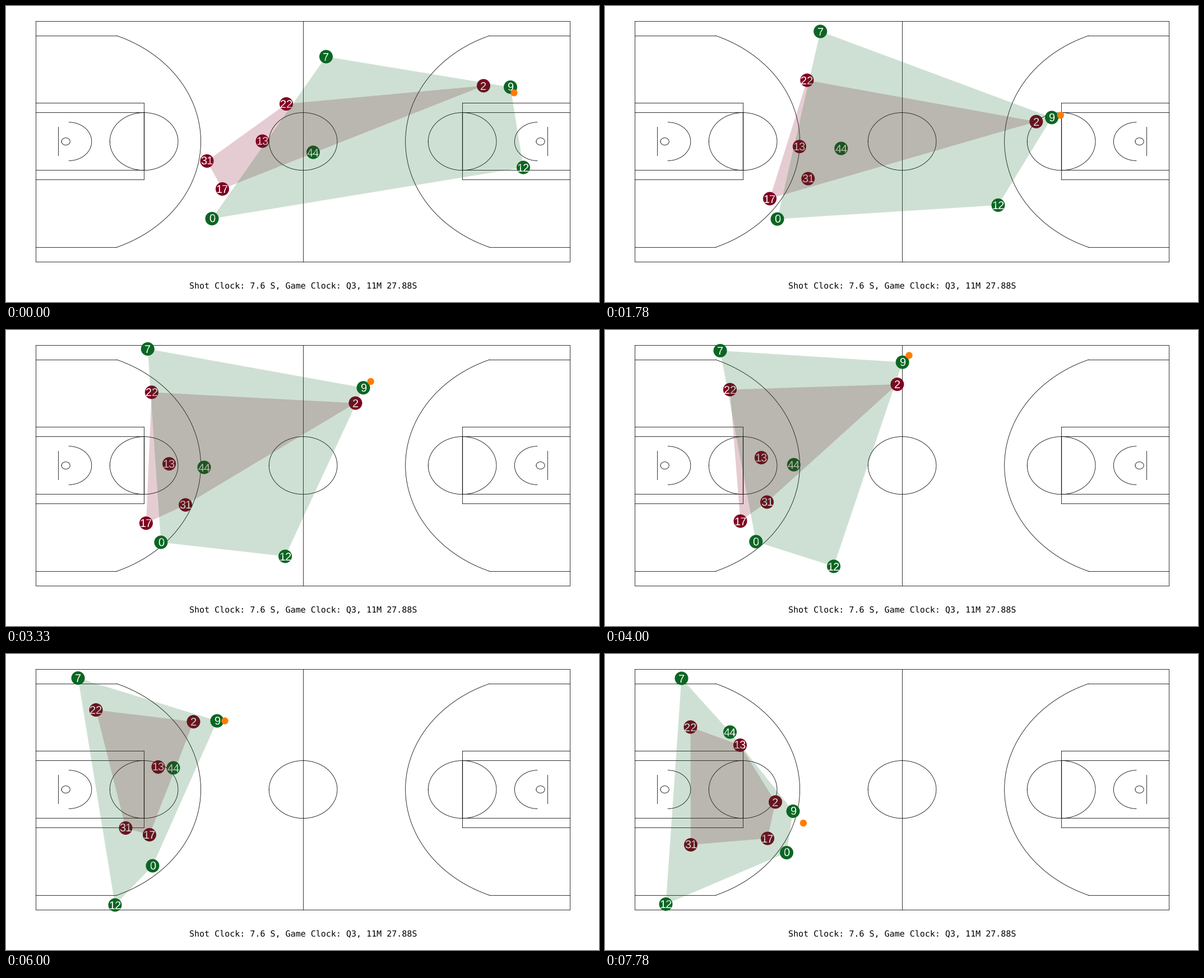
Recreate the animation shown at these times as a matplotlib script. Size 1058 by 529 pixels, loop 8 s.

```python
import math

import matplotlib.pyplot as plt
import numpy as np
from matplotlib.animation import FuncAnimation
from matplotlib.patches import Circle, Polygon

W, H, DPI = 1058, 529, 64
PX = 72 / DPI  # points per pixel
LOOP_MS, TICK_MS = 8000, 40
STEPS = 36  # positions per loop, each held for several ticks
GREEN, CRIMSON, ORANGE = "#0b6623", "#800020", "#ff7d05"
BEATS = np.array([0, 11, 22, 27, 35])  # steps at which the key points lie

# Court in feet, mapped onto the stage
LEFT, RIGHT, TOP, BOTTOM = 53.4, 1006.8, 27.25, 457.0
FT_X, FT_Y = (RIGHT - LEFT) / 94, (BOTTOM - TOP) / 50
MID_X, MID_Y = (LEFT + RIGHT) / 2, (TOP + BOTTOM) / 2

plt.rcParams["text.hinting"] = "none"
fig = plt.figure(figsize=(W / DPI, H / DPI), dpi=DPI, facecolor="white")
ax = fig.add_axes([0, 0, 1, 1])
ax.set(xlim=(0, W), ylim=(H, 0))
ax.axis("off")


def stroke(xs, ys, width=0.8):
    ax.plot(xs, ys, color="black", lw=width * PX, snap=False, zorder=1,
            solid_capstyle="projecting", solid_joinstyle="miter")


def straight(*points, width=0.8):
    """Polyline aligned to pixel centres."""
    xs, ys = np.floor(np.array(points, float)).T + 0.5
    stroke(xs, ys, width)


def arc(cx, radius, half_angle=180.0, flip=1):
    a = np.radians(np.linspace(-half_angle, half_angle, 181))
    stroke(cx + flip * radius * FT_X * np.cos(a), MID_Y + radius * FT_Y * np.sin(a))


def half_court(edge, flip):
    def at(depth, across=0):
        return edge + flip * depth * FT_X, MID_Y + across * FT_Y

    for half, width in ((8, 0.8), (6, 1.2)):
        straight(at(0, -half), at(19, -half))
        straight(at(0, half), at(19, half))
        straight(at(19, -half), at(19, half), width=width)
    straight(at(4, -3), at(4, 3))
    arc(at(19)[0], 6)
    arc(at(5.25)[0], 0.75)
    arc(at(5.8)[0], 4, 90, flip)

    arc(at(5.25)[0], 23.75, math.degrees(math.asin(22 / 23.75)), flip)
    for side in (-22, 22):
        straight(at(0, side), at(14.2, side))


def draw_court():
    straight((LEFT, TOP), (RIGHT, TOP), (RIGHT, BOTTOM), (LEFT, BOTTOM), (LEFT, TOP))
    straight((MID_X, TOP), (MID_X, BOTTOM))
    arc(MID_X, 6)
    half_court(LEFT, 1)
    half_court(RIGHT, -1)


def glide(*points):
    """Smooth Hermite curve through one key point per beat."""
    values = np.array(points, float)
    slopes = np.gradient(values, BEATS, axis=0, edge_order=2)
    t = np.arange(STEPS)
    i = np.clip(np.searchsorted(BEATS, t, side="right") - 1, 0, len(BEATS) - 2)
    span = (BEATS[i + 1] - BEATS[i])[:, None]
    u = (t - BEATS[i])[:, None] / span
    ease = u * u * (3 - 2 * u)
    return ((1 - ease) * values[i] + ease * values[i + 1]
            + u * (1 - u) * span * ((1 - u) * slopes[i] - u * slopes[i + 1]))


def convex_hull(points):
    pts = sorted(map(tuple, points))

    def chain(seq):
        out = []
        for p in seq:
            while len(out) > 1:
                (x0, y0), (x1, y1) = out[-2:]
                if (x1 - x0) * (p[1] - y0) > (y1 - y0) * (p[0] - x0):
                    break
                out.pop()
            out.append(p)
        return out[:-1]

    return chain(pts) + chain(pts[::-1])


class Marker:
    def __init__(self, color, path, label="", radius=12):
        self.path = path
        self.disc = ax.add_patch(Circle(path[0], radius, fc=color, ec="none", zorder=3))
        self.text = ax.text(0, 0, label, color="white", ha="center", va="baseline",
                            family="Liberation Sans", fontsize=20 * PX, zorder=4)

    def move(self, step):
        x, y = self.path[step]
        self.disc.center = x, y
        self.text.set_position((x, y + 7.2))


def team(color, routes):
    return [Marker(color, path, str(number)) for number, path in routes.items()]


# The ball handler weaves while bringing the ball up the court
steps = np.arange(STEPS)
weave = np.where(steps < 22, np.sin(math.tau * steps / 22), 0)
dribble = np.where(steps < 22, np.sin(math.pi * steps / 11) ** 2, 0)
handler = glide((900, 145), (747.5, 172.5), (415.5, 60), (376.5, 119.5), (335.5, 281))
handler += np.outer(weave, (-13, 27))

# The guard keeps an offset to the handler, the ball circles around him
guard = handler + glide((-48, -2.5), (-22.5, 12.5), (-14, 38.5), (-42, 1.5), (-31.5, -16.5))
angle, reach = glide((58, 12), (-95, 17), (-97, 16), (0, 14), (49, 28)).T
angle = np.radians(angle + 95 * dribble)
ball_path = handler + (reach * [np.cos(angle), np.sin(angle)]).T

draw_court()

teams = {
    CRIMSON: team(CRIMSON, {
        2: guard,
        22: glide((500, 175), (315.5, 121.5), (185.5, 102.5), (160.5, 100), (152.5, 130.5)),
        13: glide((457.5, 241.5), (318, 249), (270.5, 214.5), (271.5, 202), (241, 163)),
        31: glide((358.5, 277), (351, 314), (250.5, 304.5), (213.5, 311), (153, 341)),
        17: glide((386, 327), (271, 346.5), (240.5, 334.5), (256, 323), (290, 329.5)),
    }),
    GREEN: team(GREEN, {
        7: glide((571, 90.5), (325, 36.5), (158.5, 41), (128.5, 43), (136.5, 43.5)),
        9: handler,
        44: glide((548, 261.5), (386.5, 250.5), (318.5, 229), (298.5, 203.5), (223, 139.5)),
        12: glide((923, 288.5), (617, 377.5), (301, 439.5), (194.5, 448.5), (108.5, 447)),
        0: glide((367.5, 380), (291.5, 380.5), (263.5, 377.5), (261.5, 378.5), (324, 355)),
    }),
}
ball = Marker(ORANGE, ball_path, radius=6.2)
hulls = {color: ax.add_patch(Polygon([(0, 0)] * 3, fc=color, ec="none", alpha=0.2, zorder=5))
         for color in teams}

ax.text(530, 505, "Shot Clock: 7.6 S, Game Clock: Q3, 11M 27.88S", color="black",
        ha="center", va="baseline", family="DejaVu Sans Mono", fontsize=15 * PX)


def update(tick):
    step = min(int((tick + 0.5) * TICK_MS * STEPS / LOOP_MS), STEPS - 1)
    ball.move(step)
    for color, members in teams.items():
        for member in members:
            member.move(step)
        hulls[color].set_xy(convex_hull(m.path[step] for m in members))
    return []


anim = FuncAnimation(fig, update, frames=LOOP_MS // TICK_MS, interval=TICK_MS,
                     init_func=lambda: update(0), repeat=True, repeat_delay=0)
plt.show()
```
